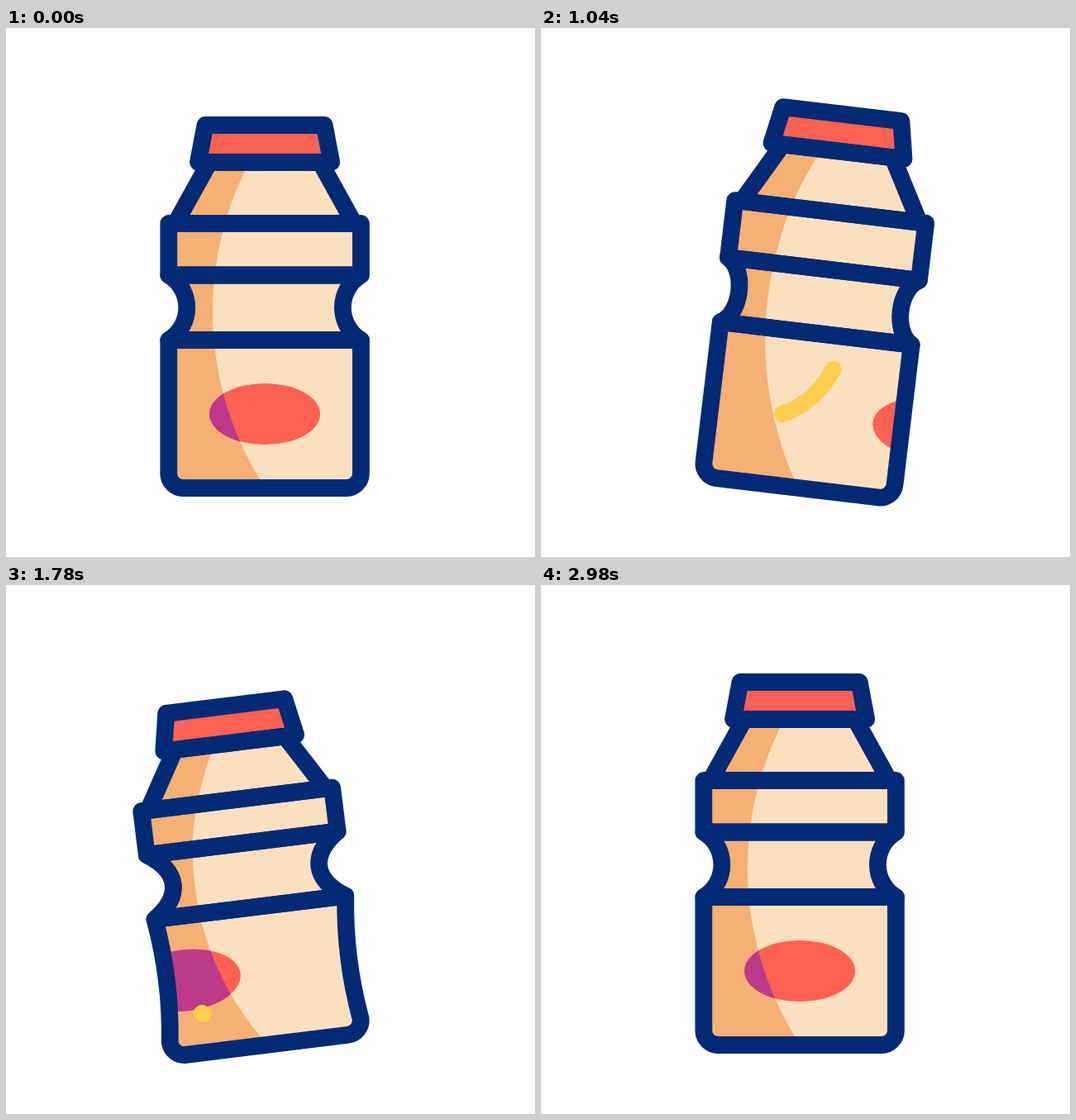
These frames come from a looping animation (640 px wide and 640 px high, 3200 ms). An HTML page with a canvas:

```html
<!DOCTYPE html>
<html lang="en">
<head>
<meta charset="utf-8">
<title>Shaken bottle</title>
<style>
  html, body { margin: 0; width: 100%; height: 100%; overflow: hidden; background: #fff; }
  canvas { display: block; width: 640px; height: 640px; }
</style>
</head>
<body>
<canvas width="640" height="640"></canvas>
<script>
const ctx = document.querySelector('canvas').getContext('2d');
const LOOP = 3200, CX = 313.1, BASE = 556.5, PIVOT = 534, LEFT = 196.8, RIGHT = 429.4;
const NAVY = '#022a74', CREAM = '#fce0be', ORANGE = '#f6af74',
      RED = '#ff6152', PURPLE = '#bc3a87', YELLOW = '#ffcd4f';

// Keys are [time, value] pairs
const LEAN = [[200, 0], [480, -5], [1100, 7.1], [1740, -7.1], [2480, 0]];
const STRETCH = [[200, 0], [500, -1.3], [1100, .9], [1160, .9], [1800, -1.07], [2520, 0]];
const SLIDE = [[200, 0], [500, -67], [1100, 154], [1160, 154], [1800, -89], [2520, 0]];

// Heights of cap top, cap bottom, band top, band bottom, body top, base
const ROWS = [117.5, 162.5, 236.5, 299, 377.5, BASE];

const swingRight = new Path2D('M67 341C80 382 106 416 140 440C190 478 245 482 292 467C320 457 341 437 354 412');
const swingLeft = new Path2D('M495 375C498 385 499.5 395 499.5 405C499.5 481 424.5 542 332 542C296 542 263 533 237 518');
const rays = [-35, 0, 35].map(deg => {
  const a = deg * Math.PI / 180, p = new Path2D();
  p.moveTo(CX + 75 * Math.sin(a), 150 - 75 * Math.cos(a));
  p.lineTo(CX + 127 * Math.sin(a), 150 - 127 * Math.cos(a));
  return p;
});

function ease(p) {
  p = Math.min(1, Math.max(0, p));
  return p * p * (3 - 2 * p);
}

function at(keys, t) {
  let v = keys[0][1];
  for (let i = 1; i < keys.length; i++) {
    const [t0, a] = keys[i - 1], [t1, b] = keys[i];
    if (t >= t0) v = a + (b - a) * ease((t - t0) / (t1 - t0));
  }
  return v;
}

function poly(...pts) {
  const p = new Path2D();
  pts.forEach(([x, y]) => p.lineTo(x, y));
  p.closePath();
  return p;
}

// Stroke that grows from its start, then shrinks towards its end
function streak(path, length, start, t) {
  const head = length * ease((t - start) / 190);
  const tail = length * ease((t - start - 233) / 352);
  if (head <= 0 || tail >= length) return;
  ctx.lineWidth = 20;
  ctx.strokeStyle = YELLOW;
  ctx.setLineDash([Math.max(.1, head - tail), 9999]);
  ctx.lineDashOffset = -tail;
  ctx.stroke(path);
  ctx.setLineDash([]);
}

// The notches get deeper and more pointed as the bottle is squashed
function waistPath(top, bottom, e) {
  const dx = (22 - 5 * e) * 4 / 3, dy = 18 - 6 * e;
  return new Path2D(`M${LEFT} ${top}
    C${LEFT + dx} ${top + dy} ${LEFT + dx} ${bottom - dy} ${LEFT} ${bottom}H${RIGHT}
    C${RIGHT - dx} ${bottom - dy} ${RIGHT - dx} ${top + dy} ${RIGHT} ${top}Z`);
}

function bodyPath(top, pinch) {
  const r = 17.5, low = BASE - r, mid = (top + low) / 2;
  return new Path2D(`M${LEFT} ${top}Q${LEFT + pinch} ${mid} ${LEFT} ${low}
    A${r} ${r} 0 0 0 ${LEFT + r} ${BASE}H${RIGHT - r}
    A${r} ${r} 0 0 0 ${RIGHT} ${low}Q${RIGHT - pinch} ${mid} ${RIGHT} ${top}Z`);
}

function shadePath(rows) {
  const pts = [[150, rows[1]]];
  for (let i = 1; i < 5; i++) {
    for (let k = 0; k <= 12; k++) {
      const y = ROWS[i] + (ROWS[i + 1] - ROWS[i]) * k / 12;
      pts.push([640 - Math.sqrt(390 ** 2 - (y - 343) ** 2),
                rows[i] + (rows[i + 1] - rows[i]) * k / 12]);
    }
  }
  return poly(...pts, [150, BASE]);
}

function label(x, color) {
  ctx.fillStyle = color;
  ctx.beginPath();
  ctx.ellipse(x, 467, 67, 37, 0, 0, 7);
  ctx.fill();
}

function bottle(t) {
  const e = at(STRETCH, t), squash = Math.min(0, e);
  const body = 11 * e, band = 19.5 * e, neck = band + 5 * squash;
  const rows = [neck, neck, band, body, body, 0].map((d, i) => ROWS[i] - d);
  const [capTop, capLow, bandTop, bandLow, bodyTop] = rows;

  const neckShape = poly([246, capLow], [380.2, capLow], [421.2, bandTop], [205, bandTop]);
  const bandShape = poly([LEFT, bandTop], [RIGHT, bandTop], [RIGHT, bandLow], [LEFT, bandLow]);
  const waist = waistPath(bandLow, bodyTop, e);
  const trunk = bodyPath(bodyTop, -10 * squash);
  const cap = poly([241, capTop], [385.2, capTop], [393.7, capLow], [232.5, capLow]);
  const shade = shadePath(rows);
  const parts = [neckShape, bandShape, waist, trunk];

  ctx.save();
  ctx.translate(CX, PIVOT);
  ctx.rotate(at(LEAN, t) * Math.PI / 180);
  ctx.translate(-CX, -PIVOT);

  for (const part of parts) {
    ctx.save();
    ctx.clip(part);
    ctx.fillStyle = CREAM;
    ctx.fill(part);
    ctx.fillStyle = ORANGE;
    ctx.fill(shade);
    ctx.restore();
  }

  const x = CX + at(SLIDE, t);
  ctx.save();
  ctx.clip(trunk);
  label(x, RED);
  ctx.clip(shade);
  label(x, PURPLE);
  ctx.restore();

  ctx.fillStyle = RED;
  ctx.fill(cap);
  ctx.strokeStyle = NAVY;
  ctx.lineWidth = 20.8;
  [...parts, cap].forEach(part => ctx.stroke(part));
  ctx.restore();
}

function draw() {
  const t = performance.now() % LOOP;
  ctx.clearRect(0, 0, 640, 640);
  ctx.lineCap = ctx.lineJoin = 'round';
  bottle(t);
  streak(swingRight, 370, 565, t);
  streak(swingLeft, 372, 1220, t);
  rays.forEach(ray => streak(ray, 52, 2395, t));
  requestAnimationFrame(draw);
}
draw();
</script>
</body>
</html>
```
